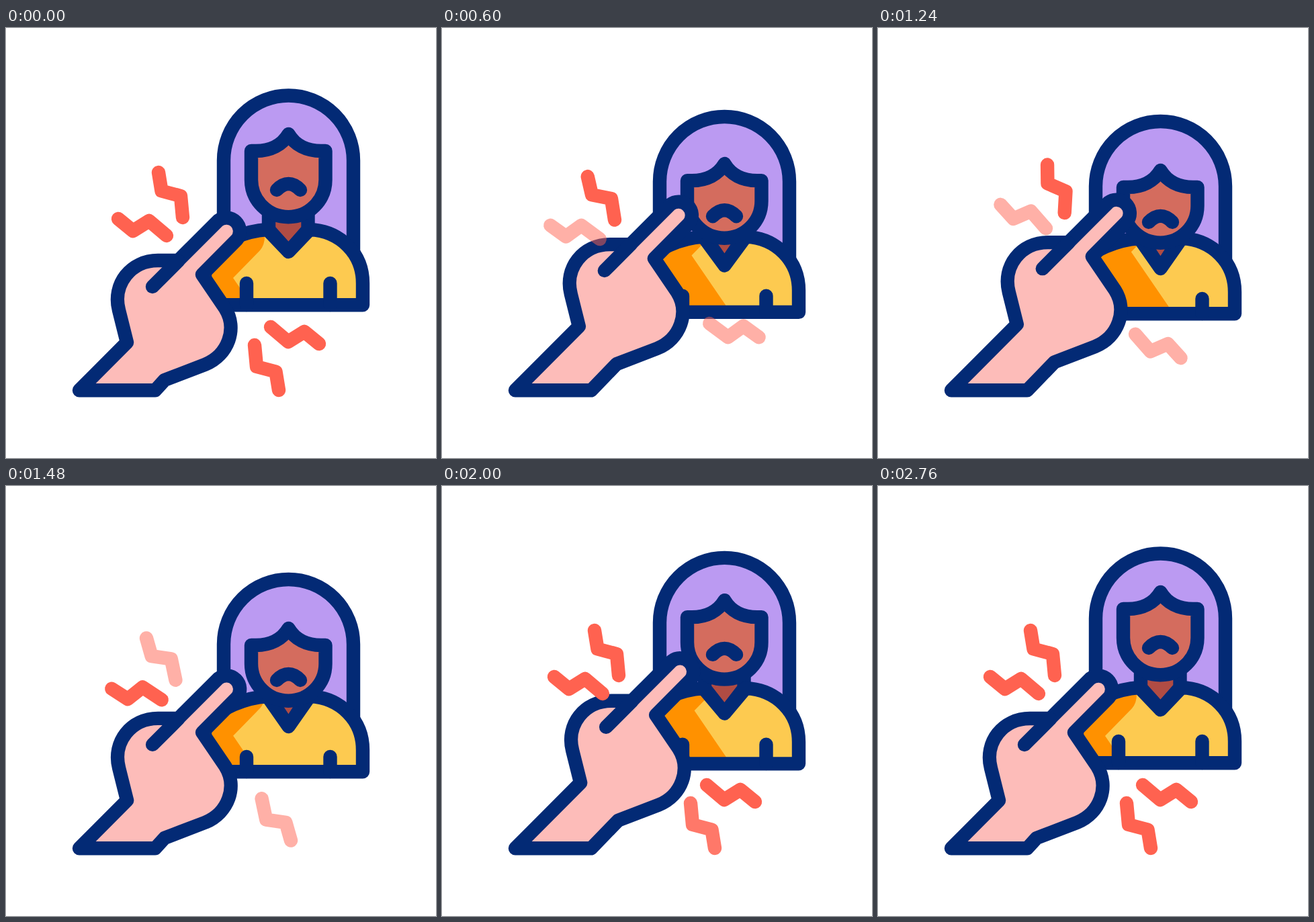
Animation, 640 px wide and 640 px high, one loop 3 s. Source, as an HTML page:

```html
<!DOCTYPE html>
<html lang="en">
<head>
<meta charset="utf-8">
<title>Pointing finger</title>
<style>
html, body { margin: 0; width: 100%; height: 100%; overflow: hidden; background: #fff; }
svg { display: block; width: 100%; height: 100%; }
.ink, .bolt { stroke-width: 20.4; stroke-linecap: round; stroke-linejoin: round; fill: none; }
.ink { stroke: #032a75; }
.bolt { stroke: #ff6250; }
</style>
</head>
<body>
<svg viewBox="0 0 640 640">
  <defs>
    <clipPath id="shirt"><path id="shirtClip"/></clipPath>
  </defs>
  <path id="hair" class="ink" style="fill:#bb9af2;stroke-linecap:butt"/>
  <path id="neck" class="ink" style="fill:#b04c44"/>
  <path id="body" style="fill:#fdca50"/>
  <g clip-path="url(#shirt)"><path id="shade" fill="#ff9100"/></g>
  <path id="bodyLine" class="ink"/>
  <path id="arms" class="ink"/>
  <path id="face" class="ink" style="fill:#d46c5e"/>
  <path id="mouth" class="ink"/>
  <path id="hand" class="ink" style="fill:#fdbcb9"/>
  <path id="crease" class="ink"/>
  <g id="bolts">
    <path id="boltA" class="bolt" d="M227 215L231.5 242.5L260 250L263 282"/>
    <path id="boltB" class="bolt" d="M167 284L189 302L213 287L239 309"/>
    <path id="boltC" class="bolt" d="M167 284L189 302L213 287L239 309" transform="rotate(180 316.5 377)"/>
    <path id="boltD" class="bolt" d="M227 215L231.5 242.5L260 250L263 282" transform="rotate(180 316.5 377)"/>
  </g>
</svg>
<script>
const LOOP = 3000, STEP = 40;
const el = {};
document.querySelectorAll('svg [id]').forEach(n => el[n.id] = n);
const draw = (id, d) => el[id].setAttribute('d', d);

const sine = u => (1 - Math.cos(Math.PI * u)) / 2;
const linear = u => u;

// Quick start with a long, soft settle.
function settle(u) {
  if (u <= 0) return 0;
  if (u >= 1) return 1;
  let lo = 0, hi = 1;
  for (let i = 0; i < 24; i++) {
    const s = (lo + hi) / 2, r = 1 - s;
    const x = 0.51 * s * r * r + 0.3 * s * s * r + s * s * s;
    if (x < u) lo = s; else hi = s;
  }
  return lo * lo * (3 - 2 * lo);
}

function track(keys, t, ease) {
  for (let i = 1; i < keys.length; i++) {
    const [t0, a] = keys[i - 1], [t1, b] = keys[i];
    if (t < t1) return a + (b - a) * ease((t - t0) / (t1 - t0));
  }
  return keys[keys.length - 1][1];
}

const POKE = [[0, 0], [528, 27.5], [832, 0], [1212, 27.5], [1492, 0], [1928, 27.5], [2440, 0]];
const SHAKE = [[0, 0], [94, 10], [284, -10], [470, 10], [660, -10], [846, 10], [1036, -10],
  [1256, 10], [1448, -10], [1636, 10], [1824, -10], [1920, 0]];

// Sinks by `depth`, then springs up past rest by `over`.
function sink(t, depth, over) {
  if (t < 1720) return depth * settle(t / 1320);
  return track([[1720, depth], [2200, -over], [2760, 0]], t, sine);
}

// Five blinks of 320 ms, fully visible before and after.
function blink(t, start) {
  const u = (t - start) / 320;
  return u < 0 || u > 5 ? 1 : (1 + Math.cos(2 * Math.PI * u)) / 2;
}

function drawGirl(head, b, tilt) {
  const top = 197 + head, base = 338 + b, y = n => n + b;
  const collar = y(333 + 12 * tilt), arm = y(380 + 10 * tilt);
  draw('hair', `M324 ${base}V${top}A96.5 96.5 0 0 1 517 ${top}V${base}`);
  draw('neck', `M391 ${y(276)}V${y(300)}L420.5 ${collar}L449.5 ${y(300)}V${y(276)}`);

  const shirt = `M531 ${y(412.3)}V${y(380)}C531 ${y(336)} 498 ${y(302)} 452 ${y(300)}` +
    `L420.5 ${collar}L389 ${y(300)}C355 ${y(302)} 320 ${y(318)} 296 ${y(340)}V${y(412.3)}Z`;
  ['body', 'shirtClip', 'bodyLine'].forEach(id => draw(id, shirt));
  draw('arms', `M358 ${arm}V${y(412)}M482.5 ${arm}V${y(412)}`);

  const f = 183 + head + 15.5 * tilt, cheek = 226 + head, m = 241 + head + 9.5 * tilt;
  draw('face', `M365 ${f}H372C394 ${f} 411 ${f - 9} 420.5 ${f - 25}` +
    `C430 ${f - 9} 447 ${f} 469 ${f}H475.5V${cheek}A55.25 55.25 0 0 1 365 ${cheek}Z`);
  draw('mouth', `M403 ${m}Q420.5 ${m - 18} 438 ${m}`);
}

function drawHand(d) {
  const at = (x, y) => `${x + d} ${y - d}`;
  draw('hand', `M109 539.3L${at(180, 468)}L${at(168, 420)}` +
    `C${at(158, 381)} ${at(186, 346)} ${at(226, 346)}L${at(256.5, 346)}L${at(316, 286.5)}` +
    `A20 20 0 0 1 ${at(344, 314.5)}L${at(292, 367)}L${at(326, 417)}` +
    `C${at(345, 447)} ${at(331, 487)} ${at(296, 501)}L${at(236, 524)}L222 539.3Z`);
  draw('crease', `M${at(218, 385)}L${at(256.5, 346.5)}`);

  // The shadow spreads faster the closer the hand gets.
  const reach = d * (1.05 + 0.0148 * d), x = 338 + reach, y = 372 - reach;
  draw('shade', `M${x} ${y}L${x + 40} ${y - 41}Q${x + 47} ${y - 49} ${x + 47} ${y - 62}` +
    `V${y - 110}H200V${y + 146}H${x + 100}Z`);
}

function render(t) {
  drawGirl(sink(t, 38.5, 12.5), sink(t, 13, 6), Math.max(0, sink(t, 1, 0)));
  drawHand(track(POKE, t, sine));
  el.bolts.setAttribute('transform', `rotate(${track(SHAKE, t, linear)} 316.5 377)`);
  ['B', 'A', 'C', 'D'].forEach((k, i) =>
    el['bolt' + k].setAttribute('opacity', blink(t, 200 + 80 * i)));
}

function tick() {
  const t = performance.now() % LOOP;
  render(Math.floor(t / STEP) * STEP);
  requestAnimationFrame(tick);
}
tick();
</script>
</body>
</html>
```
